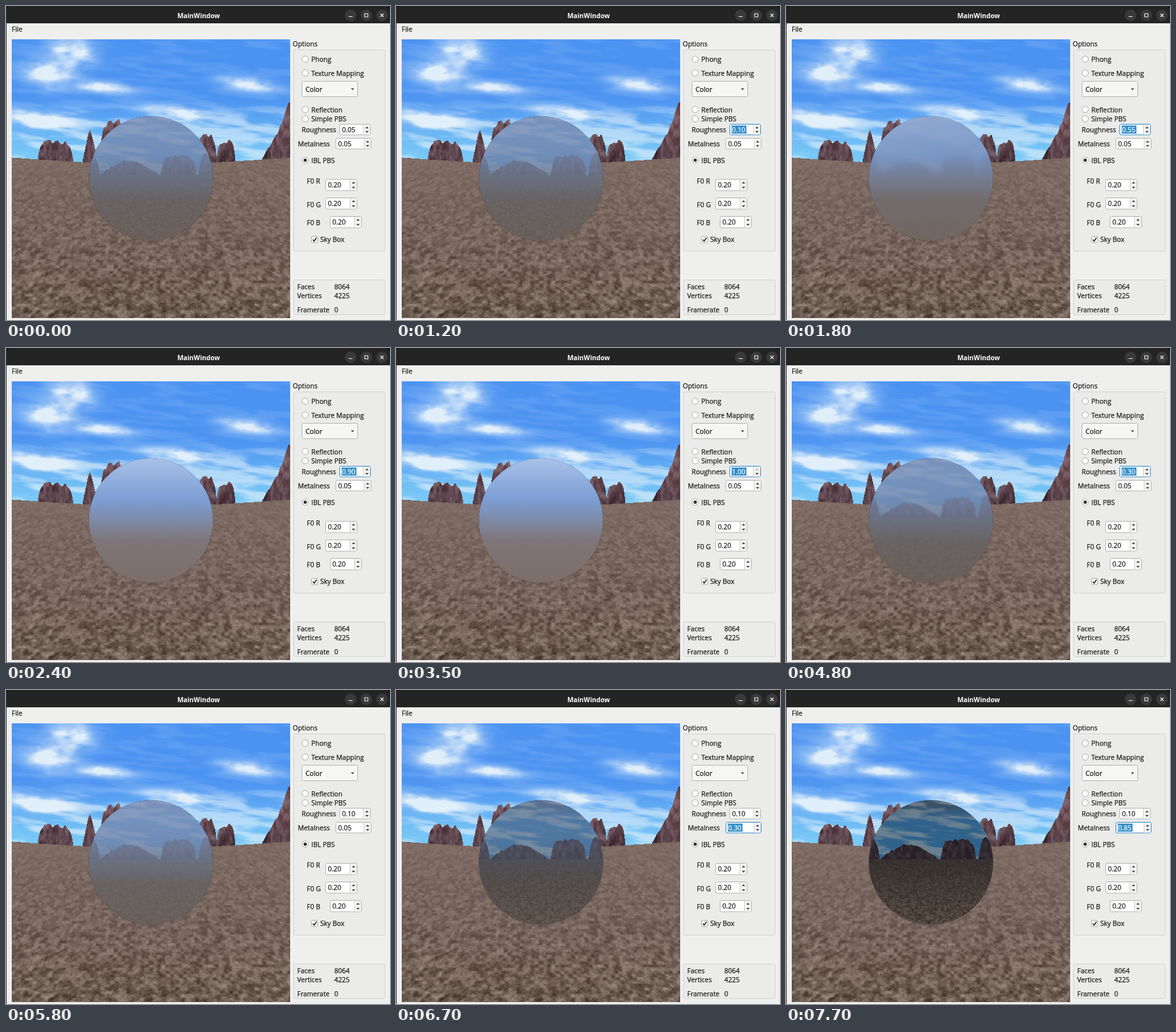
An HTML page with a canvas for the animation above (8 s loop, 600 px wide and 490 px high).

```html
<!DOCTYPE html>
<html lang="en">
<head>
<meta charset="utf-8">
<title>MainWindow</title>
<style>
html, body { margin: 0; width: 100%; height: 100%; overflow: hidden; background: #efefee; }
canvas { position: absolute; left: 9px; top: 52px; }
svg { position: absolute; left: 0; top: 0; }
text { font: 10.5px "Open Sans", "Noto Sans", sans-serif; fill: #1c1c1c; stroke: #1c1c1c; stroke-width: .25px; white-space: pre; }
</style>
</head>
<body>
<svg id="ui" width="600" height="490" viewBox="0 0 600 490"></svg>
<canvas id="view" width="435" height="435"></canvas>
<script>
const LOOP = 8000, TICK = 100, BLUE = '#308cc6';
const VIEW = { x: 9, y: 52, size: 435 };
const BALL = { x: 226.5, y: 269, r: 97 };

// Each spin moves evenly from the last value: start time, ticks, value reached.
const ROUGHNESS = [[1200, 7, .55], [2100, 4, .9], [2700, 2, 1], [3700, 6, .55], [4600, 6, .05], [5600, 1, .1]];
const METALNESS = [[6500, 7, .6], [7300, 5, .85]];
function valueAt(spins, t) {
  let value = .05;
  for (const [start, ticks, end] of spins) {
    const done = clamp((Math.floor((t - start) / TICK) + 1) / ticks);
    value += (end - value) * done;
  }
  return Math.round(value * 20) / 20;
}

// ---- Maths and noise ----
const clamp = v => Math.max(0, Math.min(1, v));
const mix = (a, b, k) => a.map((v, i) => v + (b[i] - v) * k);
const ease = k => k * k * (3 - 2 * k);
const smooth = (lo, hi, v) => ease(clamp((v - lo) / (hi - lo)));
const rgb = c => `rgb(${c.map(Math.round)})`;

function hash(i, j) {
  let h = Math.imul(i, 374761393) ^ Math.imul(j, 668265263);
  h = Math.imul(h ^ (h >>> 13), 1274126177);
  return ((h ^ (h >>> 16)) >>> 0) / 2 ** 32;
}
function noise(x, y) {
  const i = Math.floor(x), j = Math.floor(y), u = ease(x - i), v = ease(y - j);
  const top = hash(i, j) * (1 - u) + hash(i + 1, j) * u;
  const low = hash(i, j + 1) * (1 - u) + hash(i + 1, j + 1) * u;
  return top * (1 - v) + low * v;
}
const fbm = (x, y) =>
  (noise(x, y) * 4 + noise(x * 2.1, y * 2.1) * 2 + noise(x * 4.3, y * 4.3)) / 7;

// ---- Landscape ----
// Main clouds: x, y, width, height. Rocks: x, half width, height, squareness.
const CLOUDS = [[103, 70, 32, 19], [68, 106, 34, 20], [155, 128, 40, 8], [378, 122, 42, 9], [265, 166, 46, 8], [50, 175, 45, 12]];
const ROCKS = [[77, 28, 29, 7], [131, 12, 50, 1.3], [170, 27, 64, 4], [313, 16, 41, 6], [343, 15, 32, 5], [445, 46, 102, .7]];
const MIRRORED_ROCKS = [[134, 12, 32, 3], [192, 46, 23, 1.7], [269, 28, 30, 7], [313, 13, 32, 3]];

const streaks = (x, y, length) =>
  smooth(.38, .72, fbm(x / length + 9, (y - x * .1) * 5 / length));
function clouds(x, y) {
  const bulk = CLOUDS.reduce((sum, [cx, cy, w, h]) => {
    const dx = x - cx, dy = y - cy - dx * .1;
    return sum + Math.exp(-((dx / w) ** 2) - (dy / h) ** 2);
  }, 0);
  const puff = bulk * (.35 + 1.5 * fbm(x / 20, y / 11));
  return clamp(puff + streaks(x, y, 50) * (.12 + .5 * smooth(145, 185, y)));
}
const skyline = (rocks, x) => Math.max(0, ...rocks.map(([cx, w, h, p]) =>
  h * (1 - Math.abs((x - cx) / w) ** p) * (.9 + .2 * noise(x / 4, cx))));
const pebbles = (x, y, grain) =>
  fbm((x - 226) * grain / (y + 50) + 60, grain * 1.3 * Math.log(y + 50)) - .5;

function outdoors(x, y) {
  const horizon = 236 + 10 * Math.sin(Math.PI * (x - 9) / 434);
  if (y < horizon - skyline(ROCKS, x)) {
    const sky = mix([76, 147, 241], [122, 201, 246], smooth(130, 245, y));
    return mix(sky, [232, 243, 250], clouds(x, y) * .95);
  }
  if (y < horizon) {
    const rock = mix([112, 82, 90], [82, 60, 68], smooth(190, 245, y));
    return rock.map(v => v + 90 * (fbm(x / 5, y / 11) - .5));
  }
  const depth = clamp((y - horizon) / 240);
  const shade = pebbles(x, y, 75) * (25 + 100 * depth);
  return mix([125, 107, 100], [109, 92, 82], depth).map(v => v + shade);
}
function mirrored(x, y) {
  const horizon = 264;
  if (y < horizon - skyline(MIRRORED_ROCKS, x)) {
    const sky = mix([58, 78, 102], [46, 97, 138], smooth(172, 205, y));
    return mix(sky, [125, 138, 143], streaks(x, y, 34) * .75);
  }
  if (y < horizon) return [46, 38, 44].map(v => v + 45 * (fbm(x / 4, y / 8) - .5));
  const depth = (y - horizon) / 102;
  const shade = pebbles(x, y, 150) * (20 + 60 * depth);
  return mix([53, 48, 46], [80, 69, 61], depth).map(v => v + shade);
}
function paint(left, top, size, shade) {
  const canvas = document.createElement('canvas');
  canvas.width = canvas.height = size;
  const pen = canvas.getContext('2d'), image = pen.createImageData(size, size);
  for (let y = 0, p = 0; y < size; y++)
    for (let x = 0; x < size; x++, p += 4) {
      image.data.set(shade(x + left, y + top), p);
      image.data[p + 3] = 255;
    }
  pen.putImageData(image, 0, 0);
  return canvas;
}
const scenery = paint(VIEW.x, VIEW.y, VIEW.size, outdoors);
const reflection = paint(129, 172, 195, mirrored);

// ---- Sphere: diffuse light from top to bottom ----
const POLISHED = [[150, 173, 220], [136, 158, 200], [121, 117, 119], [116, 106, 101]];
const ROUGH = [[168, 193, 232], [124, 158, 212], [127, 117, 120], [124, 111, 105]];

const g = document.getElementById('view').getContext('2d');
function drawView(rough, metal) {
  g.setTransform(1, 0, 0, 1, -VIEW.x, -VIEW.y);
  g.drawImage(scenery, VIEW.x, VIEW.y);
  g.save();
  g.beginPath();
  g.arc(BALL.x, BALL.y, BALL.r, 0, 7);
  g.clip();
  g.drawImage(reflection, 129, 172);
  g.filter = `blur(${14 * rough * rough}px)`;
  g.drawImage(reflection, 129, 172);
  g.filter = 'none';

  const diffuse = g.createLinearGradient(0, BALL.y - BALL.r, 0, BALL.y + BALL.r);
  POLISHED.forEach((color, i) =>
    diffuse.addColorStop(i / 3, rgb(mix(color, ROUGH[i], smooth(.3, .9, rough)))));
  const haze = .8 * (1 - metal) ** 2.4;
  g.globalAlpha = haze + (1 - haze) * smooth(.25, .85, rough);
  g.fillStyle = diffuse;
  g.fillRect(129, 172, 195, 195);
  g.restore();
}

// ---- Window and controls ----
const ui = document.getElementById('ui');
function add(tag, attrs, content = '') {
  const node = document.createElementNS('http://www.w3.org/2000/svg', tag);
  for (const key in attrs) node.setAttribute(key, attrs[key]);
  node.textContent = content;
  return ui.appendChild(node);
}
const label = (x, y, content, extra) => add('text', { x, y, ...extra }, content);
const box = (x, y, width, height, fill, stroke = 'none', rx = 0) =>
  add('rect', { x, y, width, height, fill, stroke, rx });
const line = (d, stroke, width = 1) =>
  add('path', { d, stroke, fill: 'none', 'stroke-width': width });
const arrow = (x, y, dir) =>
  add('path', { d: `M${x - 2.7} ${y + 1.5 * dir}h5.4l-2.7 ${-3 * dir}z`, fill: '#4a4a4a' });

function radio(y, caption, on) {
  add('circle', { cx: 467.5, cy: y, r: 4.9, fill: '#fff', stroke: '#a9a9a8' });
  if (on) add('circle', { cx: 467.5, cy: y, r: 2.6, fill: '#333' });
  label(477, y + 4.3, caption);
}
function spinBox(x, y, width, height, caption) {
  const frame = box(x, y, width, height, '#fff', '#b4b4b3', 2);
  const right = x + width;
  box(right - 11, y + .5, 10.5, height - 1, '#f3f3f2');
  line(`M${right - 11} ${y + .5}v${height - 1}`, '#cfcfce');
  const up = arrow(right - 5.5, y + 5, 1);
  arrow(right - 5.5, y + height - 4.5, -1);
  const mark = box(x + 3, y + 2, 23, height - 4, BLUE);
  const text = label(x + 3.5, y + height / 2 + 4, caption);
  return (value, focused, selected) => {
    frame.setAttribute('stroke', focused ? BLUE : '#b4b4b3');
    mark.style.display = selected ? '' : 'none';
    text.style.fill = text.style.stroke = selected ? '#fff' : '#1c1c1c';
    text.textContent = value;
    up.setAttribute('fill', value === '1.00' ? '#b8b8b8' : '#4a4a4a');
  };
}

box(0, 0, 600, 12, '#111');
box(0, 0, 600, 27, '#252424', 'none', 7);
box(0, 14, 600, 13, '#252424');
box(0, 27, 600, 463, '#efefee');
box(0, 0, 1, 490, '#333');
label(301, 18.5, 'MainWindow', {
  'text-anchor': 'middle', style: 'font-size:10.2px;font-weight:700;fill:#fff;stroke:none'
});
for (const cx of [538.5, 563, 587.5]) add('circle', { cx, cy: 14.5, r: 9, fill: '#3b3a3a' });
line('M535.5 16.5h6M560.5 12h5v5h-5zM585 12l5 5m0-5l-5 5', '#f2f2f2', 1.1);
label(9, 40, 'File');

label(448, 63, 'Options');
box(449.5, 68.5, 143, 314, '#ebebea', '#d3d3d2', 2);
radio(83, 'Phong');
radio(104.5, 'Texture Mapping');
box(462.5, 117.5, 87, 24, '#f6f6f5', '#b4b4b3', 2);
label(468, 133.7, 'Color');
arrow(541.5, 130, -1);
radio(161.5, 'Reflection');
radio(176, 'Simple PBS');
label(462, 197, 'Roughness');
label(456, 219, 'Metalness');
radio(240.5, 'IBL PBS', true);
const roughBox = spinBox(521.5, 184.5, 48, 16.5);
const metalBox = spinBox(515.5, 206.5, 55, 16.5);
[['F0 R', 277, 499.5, 270.5], ['F0 G', 313.5, 499.5, 299.5], ['F0 B', 342, 506.5, 328.5]]
  .forEach(([name, base, x, y]) => {
    label(470, base, name);
    spinBox(x, y, 49, 17.5)('0.20', false, false);
  });
box(477.5, 359.5, 9.5, 9.5, '#fff', '#a9a9a8', 1);
line('M479.5 364.5l2 2.5 3.7-5.5', '#222', 1.6);
label(491, 368.3, 'Sky Box');

box(449.5, 427.5, 143, 54, '#ebebea', '#d3d3d2', 2);
[['Faces', '8064', 441.5], ['Vertices', '4225', 456], ['Framerate', '0', 478]]
  .forEach(([name, value, y]) => {
    label(455, y, name);
    label(513, y, value);
  });

// ---- Playback ----
const start = performance.now();
let shown = '';
function tick() {
  const t = (performance.now() - start) % LOOP;
  const rough = valueAt(ROUGHNESS, t), metal = valueAt(METALNESS, t);
  roughBox(rough.toFixed(2), t >= 700 && t < 5800, t >= 1200 && t < 5800);
  metalBox(metal.toFixed(2), t >= 5900, t >= 6500);
  const key = rough + '/' + metal;
  if (key !== shown) drawView(rough, metal);
  shown = key;
  requestAnimationFrame(tick);
}
tick();
</script>
</body>
</html>
```
